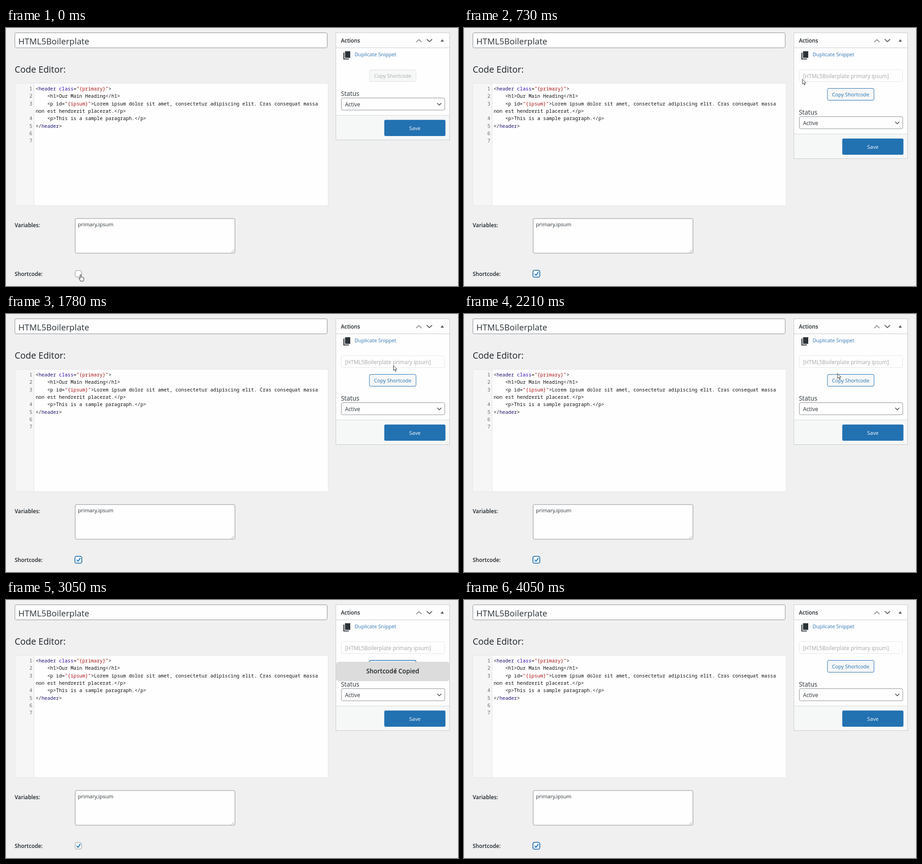
These frames come from a looping animation (990x566 px, 4.15 s). An HTML page:

```html
<!DOCTYPE html>
<html lang="en">
<head>
<meta charset="utf-8">
<title>Snippet editor</title>
<style>
html, body { margin: 0; width: 100%; height: 100%; overflow: hidden; background: #f0f0f1; }
svg { display: block; }
text { font-family: "Open Sans", "Noto Sans", sans-serif; fill: #2c3338; white-space: pre; }
.semi { font-weight: 600; font-size: 11.8px; fill: #1d2327; }
.code text { font-family: "Noto Sans Mono", "DejaVu Sans Mono", monospace; font-size: 10.64px; fill: #111; }
.code .num { fill: #666; text-anchor: end; }
.tag { fill: #1c1470; }
.attr { fill: #3300aa; }
.str { fill: #aa1111; }
.field { fill: #fefefe; stroke: #8c8f94; }
.mid { text-anchor: middle; }
.btn { font-size: 11.1px; text-anchor: middle; }
.line { fill: none; stroke-linecap: round; stroke-linejoin: round; }
</style>
</head>
<body>
<svg width="990" height="566" viewBox="0 0 990 566">
  <rect width="990" height="566" fill="#f0f0f1"/>

  <rect class="field" x="19.5" y="10.5" width="684" height="33" rx="3"/>
  <text x="27" y="35.5" font-size="18.6">HTML5Boilerplate</text>
  <text x="19" y="97.5" font-size="19.5" style="fill:#1d2327">Code Editor:</text>

  <rect x="19.5" y="121.5" width="686" height="268" fill="#fefefe" stroke="#e6e6e8"/>
  <rect x="20" y="122" width="41" height="267" fill="#f6f6f6"/>
  <path d="M61.5 122V389" stroke="#e2e2e2"/>
  <g class="code" id="code"></g>

  <text class="semi" x="19" y="437">Variables:</text>
  <rect class="field" x="151.5" y="418" width="350" height="76" rx="3"/>
  <path d="M493.5 492.5l6-6M497 492.5l2.5-2.5" stroke="#888" stroke-width=".8"/>
  <text x="157.5" y="435" font-size="11.5">primary,ipsum</text>

  <text class="semi" x="19" y="543.5">Shortcode:</text>
  <rect id="box" class="field"/>
  <path id="tick" class="line" d="M155.3 539.6l2.5 3 4.6-6.6" stroke="#2b7fc4" stroke-width="2.2"/>

  <rect id="panel" x="722.5" y="10.5" width="249" fill="#fefefe" stroke="#c9cacd"/>
  <path d="M723 43.5H971" stroke="#c9cacd"/>
  <text class="semi" x="733.5" y="32">Actions</text>
  <path class="line" d="M899 30.5l5.3-5 5.3 5" stroke="#8f9296" stroke-width="1.8"/>
  <path class="line" d="M922 25l5.4 5 5.4-5" stroke="#5c6167" stroke-width="1.8"/>
  <path d="M951.8 30h7.4l-3.7-5.6z" fill="#5c6167"/>
  <path d="M742.5 51h11.5v14.5h-11.5zM739 54h2v13.2h10v1.8h-12z" fill="#2c3338"/>
  <text x="763.5" y="62" font-size="11.1" style="fill:#2f74b0">Duplicate Snippet</text>

  <g id="short">
    <rect x="734.5" y="91.5" width="226" height="26" rx="3" fill="#fefefe" stroke="#e6e6e8"/>
    <text x="742.5" y="109.5" font-size="11.7" style="fill:#a5a7a9">[HTML5Boilerplate primary ipsum]</text>
  </g>
  <g id="lower">
    <rect id="copy" x="796" y="91.5" width="102" height="26" rx="3" fill="#f6f7f7"/>
    <text id="copyText" class="btn" x="847" y="109">Copy Shortcode</text>
    <text x="733.5" y="148.5" font-size="13.9">Status</text>
    <rect class="field" x="734.5" y="153.5" width="226.500" height="26.500" rx="3"/>
    <text x="742.5" y="172" font-size="12">Active</text>
    <path class="line" d="M945 165.200l4 4 4-4" stroke="#444a50" stroke-width="1.6"/>
    <rect x="723" y="191" width="248" height="54" fill="#f6f7f7"/>
    <path d="M723 191.500H971" stroke="#d5d6d9"/>
    <rect x="828.500" y="201.500" width="134" height="35.500" rx="3" fill="#2271b1"/>
    <text class="mid" x="895.500" y="224" font-size="11.5" style="fill:#fff">Save</text>
  </g>

  <g id="toast">
    <rect x="723" y="135.500" width="248.500" height="42.500" rx="6" fill="#dcdcdc"/>
    <text class="semi mid" x="847" y="161" style="font-size:13.6px">Shortcode Copied</text>
  </g>

  <g id="cursor">
    <path id="arrow" d="M0 0V10.700L2.500 8.400L4.300 12.500L6 11.800L4.300 7.800H7.600Z" fill="#fff" stroke="#222" stroke-width=".9"/>
    <path id="hand" d="M-1.200 .8Q-1.200-.5 0-.5T1.200 .8V5Q2.400 4.200 3.300 5.300Q4.500 4.700 5.200 5.900Q6.900 5.500 6.900 7.300V10Q6.900 12 5.700 13.800H-.3Q-1.500 11.300-3.700 8.900Q-4.200 7.300-2.800 7.300L-1.200 8.700Z" fill="#fff" stroke="#222" stroke-width="1"/>
    <path id="beam" class="line" d="M-2-5Q0-5 0-4Q0-5 2-5M0-4V4M-2 5Q0 5 0 4Q0 5 2 5" stroke="#333"/>
  </g>
</svg>

<script>
const LOOP = 4150;
const $ = id => document.getElementById(id);

// Line number (or blank for a wrapped row) and coloured parts
const rows = [
  [1, '<', '', 'header', 'tag', ' class', 'attr', '=', '', '"{primary}"', 'str', '>', ''],
  [2, '    <h1>Our Main Heading</h1>', ''],
  [3, '    <p id=', '', '"{ipsum}"', 'str', '>Lorem ipsum dolor sit amet, consectetur adipiscing elit. Cras consequat massa', ''],
  ['', 'non est hendrerit placerat.</p>', ''],
  [4, '    <p>This is a sample paragraph.</p>', ''],
  [5, '</', '', 'header', 'tag', '>', ''],
  [6], [7]
];

function svgText(parent, tag, attrs, value) {
  const el = document.createElementNS('http://www.w3.org/2000/svg', tag);
  for (const k in attrs) el.setAttribute(k, attrs[k]);
  el.textContent = value;
  return parent.appendChild(el);
}

rows.forEach(([num, ...parts], i) => {
  const y = 137 + i * 16.3;
  svgText($('code'), 'text', { x: 57.5, y, class: 'num' }, num);
  const line = svgText($('code'), 'text', { x: 65, y }, '');
  for (let k = 0; k < parts.length; k += 2)
    svgText(line, 'tspan', { class: parts[k + 1] }, parts[k]);
});

// time, x, y of the pointer's hot spot
const path = [
  [0, 163.5, 541.5], [150, 163, 541], [360, 430, 350], [570, 728, 122],
  [730, 741, 112.5], [1000, 820, 112], [1150, 892, 110], [1310, 902.5, 108.5],
  [1500, 944, 110], [1730, 854, 112], [2000, 826, 119], [2210, 818, 130.5],
  [2450, 842, 144], [2780, 854, 149], [3050, 855.5, 154], [3180, 560, 350],
  [3360, 187, 546], [3470, 160, 539], [4150, 160, 538.5]
];

// start time and value of each hard change
const pointers = [[0, 'hand'], [200, 'arrow'], [2310, 'hand'], [2840, 'beam'], [3100, 'arrow'], [3420, 'hand'], [3990, '']];
const checks = [[0, false], [100, true], [3470, false], [3570, true]];
const focuses = [[0, ''], [100, 'box'], [2680, 'copy'], [3470, 'box']];

const at = (steps, t) => steps.filter(s => s[0] <= t).pop()[1];

function pointAt(t) {
  const i = Math.max(1, path.findIndex(p => p[0] >= t));
  const [t0, x0, y0] = path[i - 1], [t1, x1, y1] = path[i];
  const k = (t - t0) / (t1 - t0);
  return [x0 + (x1 - x0) * k, y0 + (y1 - y0) * k];
}

function set(id, attrs) {
  for (const k in attrs) $(id).setAttribute(k, attrs[k]);
}

const show = (id, on) => set(id, { visibility: on ? 'visible' : 'hidden' });

function draw(t) {
  const on = at(checks, t), focus = at(focuses, t), shift = on ? 41 : 0;
  const ring = focus === 'box';
  const size = ring ? 15 : 14;

  set('box', { x: 158.5 - size / 2, y: 539.2 - size / 2, width: size, height: size, rx: 3.5 });
  $('box').style.stroke = ring ? '#2271b1' : '#8c8f94';
  $('box').style.strokeWidth = ring ? 1.8 : 1;
  show('tick', on);

  set('panel', { height: 235 + shift });
  set('lower', { transform: `translate(0 ${shift})` });
  show('short', on);
  set('copy', { stroke: on ? '#2271b1' : '#dfe0e2', 'stroke-width': focus === 'copy' ? 1.6 : 1 });
  $('copyText').style.fill = on ? '#2271b1' : '#a7aaad';
  show('toast', t >= 2840 && t < 3310);

  const [x, y] = pointAt(t), pointer = at(pointers, t);
  set('cursor', { transform: `translate(${x} ${y})` });
  for (const id of ['arrow', 'hand', 'beam']) show(id, id === pointer);
}

const start = performance.now();
function tick() {
  draw((performance.now() - start) % LOOP);
  requestAnimationFrame(tick);
}
tick();
</script>
</body>
</html>
```
